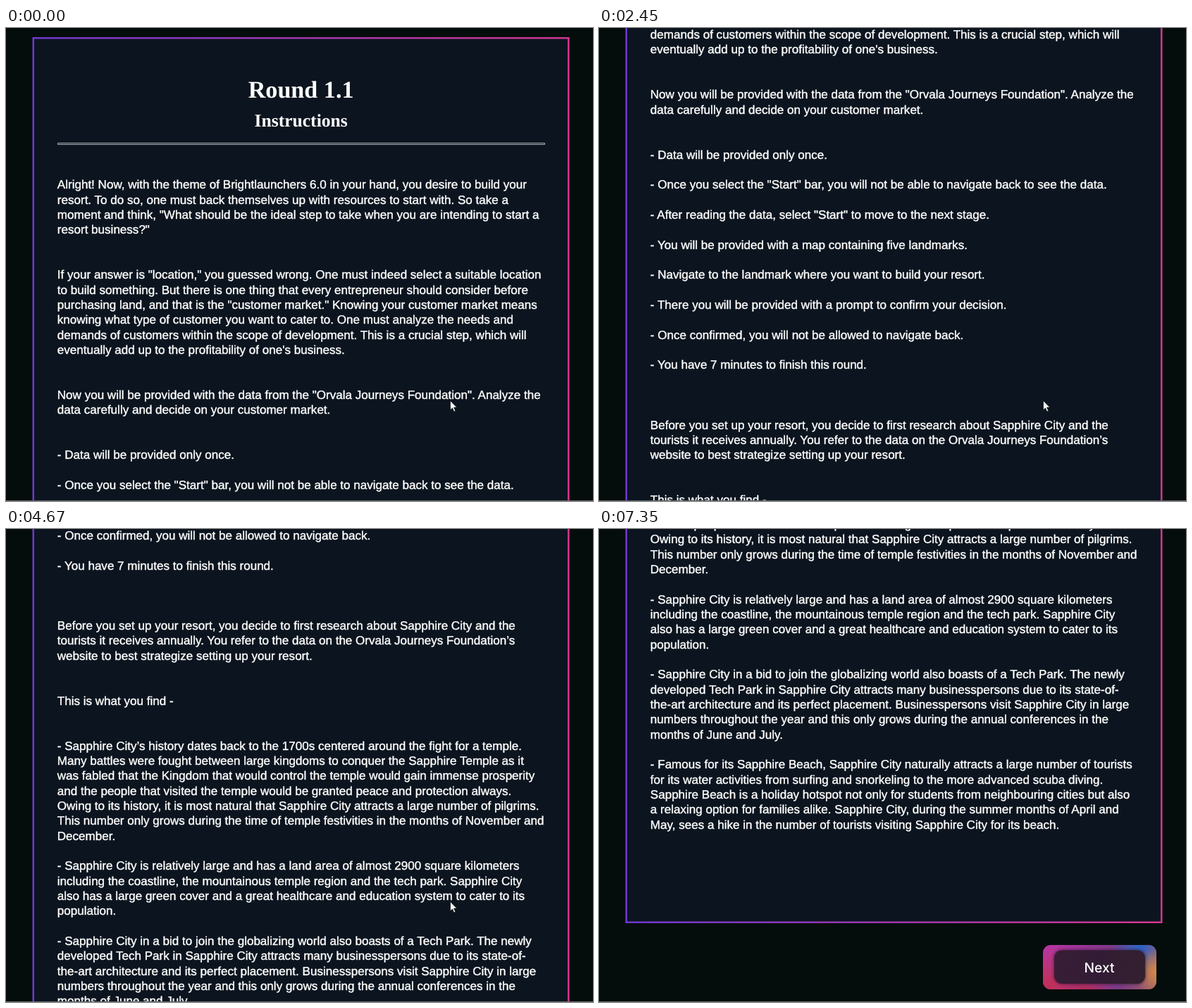
These frames come from a looping animation (833 px wide and 672 px high, 8 s). An HTML page with a canvas:

```html
<!DOCTYPE html>
<html lang="en">
<head>
<meta charset="utf-8">
<style>
  html, body { margin: 0; width: 100%; height: 100%; overflow: hidden; background: #050d0c; }
  canvas { display: block; width: 833px; height: 672px; }
</style>
</head>
<body>
<canvas id="stage" width="833" height="672"></canvas>
<script>
const W = 833, H = 672, LOOP = 8000, TICK = 80 / 3;
const LINE = 64 / 3, FIRST_BASELINE = 228.4, LEFT = 72.8, CENTER = 418.6;
const ctx = document.getElementById('stage').getContext('2d');
ctx.textRendering = 'geometricPrecision';

// Each line of text sits on one row of the line grid; an empty line is a blank row.
const lines = `Alright! Now, with the theme of Brightlaunchers 6.0 in your hand, you desire to build your
resort. To do so, one must back themselves up with resources to start with. So take a
moment and think, "What should be the ideal step to take when you are intending to start a
resort business?"


If your answer is "location," you guessed wrong. One must indeed select a suitable location
to build something. But there is one thing that every entrepreneur should consider before
purchasing land, and that is the "customer market." Knowing your customer market means
knowing what type of customer you want to cater to. One must analyze the needs and
demands of customers within the scope of development. This is a crucial step, which will
eventually add up to the profitability of one's business.


Now you will be provided with the data from the "Orvala Journeys Foundation". Analyze the
data carefully and decide on your customer market.


- Data will be provided only once.

- Once you select the "Start" bar, you will not be able to navigate back to see the data.

- After reading the data, select "Start" to move to the next stage.

- You will be provided with a map containing five landmarks.

- Navigate to the landmark where you want to build your resort.

- There you will be provided with a prompt to confirm your decision.

- Once confirmed, you will not be allowed to navigate back.

- You have 7 minutes to finish this round.



Before you set up your resort, you decide to first research about Sapphire City and the
tourists it receives annually. You refer to the data on the Orvala Journeys Foundation’s
website to best strategize setting up your resort.


This is what you find -


- Sapphire City’s history dates back to the 1700s centered around the fight for a temple.
Many battles were fought between large kingdoms to conquer the Sapphire Temple as it
was fabled that the Kingdom that would control the temple would gain immense prosperity
and the people that visited the temple would be granted peace and protection always.
Owing to its history, it is most natural that Sapphire City attracts a large number of pilgrims.
This number only grows during the time of temple festivities in the months of November and
December.

- Sapphire City is relatively large and has a land area of almost 2900 square kilometers
including the coastline, the mountainous temple region and the tech park. Sapphire City
also has a large green cover and a great healthcare and education system to cater to its
population.

- Sapphire City in a bid to join the globalizing world also boasts of a Tech Park. The newly
developed Tech Park in Sapphire City attracts many businesspersons due to its state-of-
the-art architecture and its perfect placement. Businesspersons visit Sapphire City in large
numbers throughout the year and this only grows during the annual conferences in the
months of June and July.

- Famous for its Sapphire Beach, Sapphire City naturally attracts a large number of tourists
for its water activities from surfing and snorkeling to the more advanced scuba diving.
Sapphire Beach is a holiday hotspot not only for students from neighbouring cities but also
a relaxing option for families alike. Sapphire City, during the summer months of April and
May, sees a hike in the number of tourists visiting Sapphire City for its beach.`.split('\n');

// Wheel scrolls: first visible step, time already eased by then, distance.
const NOTCH = 640 / 3, SCROLL_MS = 138;
const scrolls = [
  { at: 2010, lead: 26.4, by: NOTCH },
  { at: 2320, lead: 14, by: NOTCH },
  { at: 4160, lead: 6.7, by: NOTCH },
  { at: 4530, lead: 8, by: NOTCH },
  { at: 6350, lead: 16, by: NOTCH },
  { at: 6540, lead: 20.6, by: 1232 - 5 * NOTCH }
];

// cubic-bezier(.42, 0, .58, 1)
function easeInOut(x) {
  if (x >= 1) return 1;
  let lo = 0, hi = 1;
  for (let i = 0; i < 24; i++) {
    const s = (lo + hi) / 2;
    if (1.26 * s - 0.78 * s * s + 0.52 * s ** 3 < x) lo = s; else hi = s;
  }
  return lo * lo * (3 - 2 * lo);
}

const stepsSince = (t, start) => Math.floor((t - start + 4) / TICK);

function scrollAt(t) {
  return scrolls.reduce((sum, { at, lead, by }) =>
    t < at ? sum : sum + by * easeInOut((stepsSince(t, at) * TICK + lead) / SCROLL_MS), 0);
}

// A hairline stroke in the text colour gives the glyphs their fuller weight.
function label(text, x, y, font, align = 'left', weight = 0) {
  ctx.font = font;
  ctx.textAlign = align;
  ctx.fillStyle = ctx.strokeStyle = '#fff';
  ctx.fillText(text, x, y);
  if (weight) {
    ctx.lineWidth = weight;
    ctx.lineJoin = 'round';
    ctx.strokeText(text, x, y);
  }
}

function gradient(x0, y0, x1, y1, ...colors) {
  const g = ctx.createLinearGradient(x0, y0, x1, y1);
  colors.forEach((c, i) => g.addColorStop(i / (colors.length - 1), c));
  return g;
}

function glow(x, y, r, rgb) {
  const g = ctx.createRadialGradient(x, y, 0, x, y, r);
  g.addColorStop(0, `rgba(${rgb},1)`);
  g.addColorStop(1, `rgba(${rgb},0)`);
  ctx.fillStyle = g;
  ctx.fillRect(x - r, y - r, 2 * r, 2 * r);
}

function roundRect(x, y, w, h, r) {
  ctx.beginPath();
  ctx.roundRect(x, y, w, h, r);
}

function drawPanel(top) {
  const left = 37.5, width = 762, height = 1779, border = 2.5;
  ctx.fillStyle = gradient(left, 0, left + width, 0, '#7038d0', '#d2368f');
  ctx.fillRect(left, top, width, height);
  ctx.fillStyle = '#0c151f';
  ctx.fillRect(left + border, top + border, width - 2 * border, height - 2 * border);
}

function drawHeader(offset) {
  label('Round 1.1', CENTER, 99 - offset, 'bold 34.133px "Liberation Serif", serif', 'center');
  label('Instructions', CENTER, 140 - offset, 'bold 25.6px "Liberation Serif", serif', 'center');
  ctx.strokeStyle = '#a8adb1';
  ctx.lineWidth = 1;
  ctx.strokeRect(73.5, 163.5 - offset, 691, 2);
}

function drawText(scroll) {
  lines.forEach((text, i) => {
    const y = Math.round(FIRST_BASELINE + i * LINE - scroll);
    if (text && y > -10 && y < H + 20)
      label(text, LEFT, y, '17.0667px "Liberation Sans", Arial, sans-serif', 'left', 0.4);
  });
}

function drawButton(y) {
  ctx.save();
  roundRect(630, y, 161, 63, 11);
  ctx.clip();
  ctx.fillStyle = gradient(630, 0, 791, 0, '#b837a8', '#9c3596', '#7a3a86', '#a06068');
  ctx.fillRect(630, y, 161, 63);
  glow(640, y + 58, 60, '192,48,86');
  glow(690, y + 66, 40, '176,44,88');
  glow(768, y + 2, 42, '42,98,200');
  glow(792, y + 38, 34, '212,140,70');
  ctx.restore();
  ctx.save();
  ctx.shadowColor = 'rgba(20,8,24,.75)';
  ctx.shadowBlur = 5;
  ctx.fillStyle = gradient(646, 0, 775, 0, '#391d36', '#321c35', '#33202f');
  roundRect(646, y + 7.5, 129, 47.5, 11);
  ctx.fill();
  ctx.restore();
  label('Next', 710, y + 39, '500 19.2px Inter, sans-serif', 'center');
}

const arrow = new Path2D('M0 0V13.2L3 10.4L5.2 15.4L7.3 14.4L5.1 9.6H9.2Z');

function drawCursor(t) {
  if (t >= 7350) return;
  const k = t < 7040 ? 0 : Math.min(10, stepsSince(t, 7040) + 1) / 10;
  ctx.save();
  ctx.translate(630.5 - 51 * k, 529.5 + 11 * k);
  ctx.fillStyle = '#fff';
  ctx.strokeStyle = '#10151a';
  ctx.lineWidth = 0.8;
  ctx.fill(arrow);
  ctx.stroke(arrow);
  ctx.restore();
}

function draw(t) {
  const scroll = scrollAt(t), offset = Math.round(scroll);
  ctx.fillStyle = '#050d0c';
  ctx.fillRect(0, 0, W, H);
  drawPanel(13 - offset);
  drawHeader(offset);
  drawText(scroll);
  drawButton(1823 - offset);
  ctx.fillStyle = '#596164';
  ctx.fillRect(0, H - 1, W, 1);
  drawCursor(t);
}

const began = performance.now();
function tick() {
  draw((performance.now() - began) % LOOP);
  requestAnimationFrame(tick);
}
tick();
</script>
</body>
</html>
```
